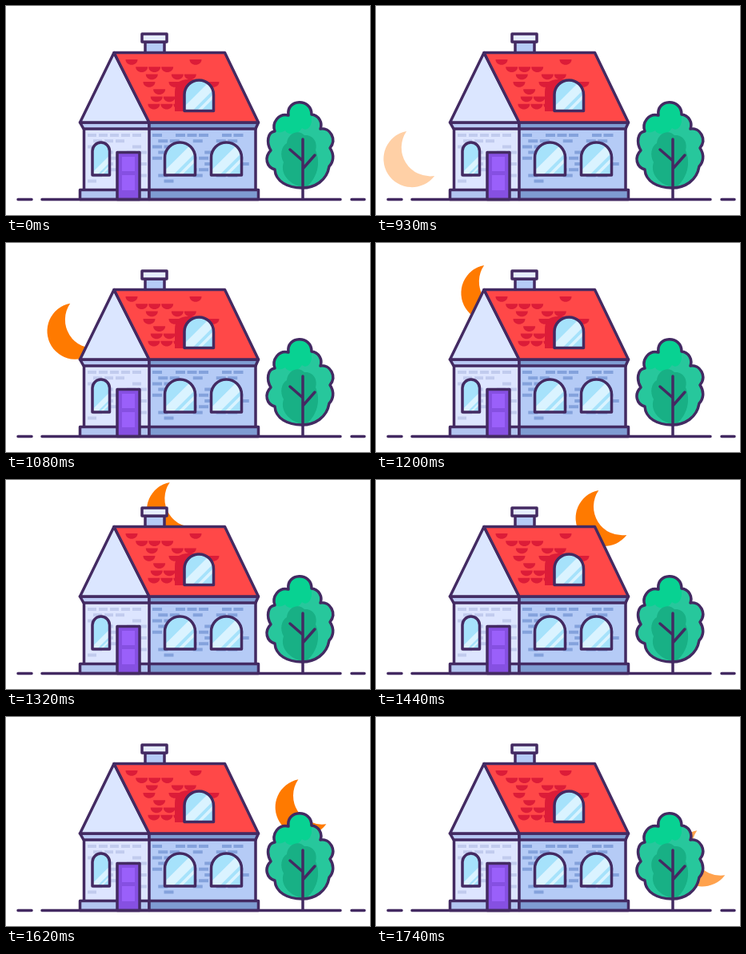
An HTML page that plays this animation: 455 px wide and 262 px high, repeating every 1770 ms.

```html
<!DOCTYPE html>
<html lang="en">
<head>
<meta charset="utf-8">
<title>House and moon</title>
<style>
  html, body { margin: 0; width: 100%; height: 100%; overflow: hidden; background: #fff; }
  svg { display: block; width: 455px; height: 262px; }
  .line { stroke: #432a62; stroke-width: 3.5; stroke-linejoin: round; stroke-linecap: round; }
</style>
</head>
<body>
<svg viewBox="0 0 455 262" fill="none">
  <path id="moon" fill="#ff7a00" d="M0 0A35.4 35.4 0 1 0 35 56A36 36 0 0 1 0 0Z"/>

  <g class="line">
    <path fill="#b5cbf6" d="M174 45H198V59H174Z"/>
    <path fill="#e6edff" d="M170 35H201V45H170Z"/>
  </g>

  <path fill="#dde5ff" d="M97 152H179V242H97Z"/>
  <path fill="#b5cbf6" d="M179 152H312V242H179Z"/>
  <path id="frontBricks" fill="#c1cbee"/>
  <path id="sideBricks" fill="#84a2dc"/>
  <g class="line">
    <path d="M97.5 154V231M179 154V231M312 154V231"/>
    <path fill="#b2c5f0" d="M92.5 230.5H179V242.5H92.5Z"/>
    <path fill="#7f9cd2" d="M179 230.5H315.5V242.5H179Z"/>
    <path fill="#b9c9f4" d="M92.5 146H179V154H97Z"/>
    <path fill="#7f9cd2" d="M179 146H315.5L312 154H179Z"/>
    <path fill="#dbe6ff" d="M135 58.5L92.5 146H179Z"/>
    <path fill="#ff4848" d="M135 58.5H273.5L315.5 146H179Z"/>
  </g>
  <path id="tiles" fill="#dc1c38"/>
  <path fill="#dc1c38" d="M211 132V108Q211 92 228 92H242V132Z"/>
  <g id="windows"></g>

  <path class="line" fill="#8650e2" d="M139 183.5H167V242.5H139Z"/>
  <path fill="#9a60fa" d="M145 189H161V207H145ZM145 212H161V231H145Z"/>

  <clipPath id="crown">
    <path id="leaves" d="M353 137C350 116 382 115 382 136C391 137 396 146 393 154C405 152 414 167 405 178C411 187 409 196 404 201C401 219 386 228 370 228C352 228 337 220 336 205C326 202 322 190 331 181C325 171 327 158 336 157C332 146 341 134 353 137Z"/>
  </clipPath>
  <g clip-path="url(#crown)">
    <path fill="#27c79c" d="M320 110H415V235H320Z"/>
    <path fill="#08d292" d="M325 110H382V145C380 154 375 157 370 153C364 163 352 162 349 156C344 160 337 159 334 154Z"/>
    <path fill="#18b085" d="M351 172C352 159 366 154 373 162C384 161 390 171 387 181C394 197 389 217 374 228C355 225 342 211 347 196C342 187 344 176 351 172Z"/>
  </g>
  <use href="#leaves" class="line"/>
  <path class="line" d="M371 167V242M371 194L355 180M371 204L386 187"/>
  <path class="line" d="M15 242.5H32M45 242.5H418M432 242.5H448"/>
</svg>

<script>
const LOOP = 1770, STEP = 30, RISE = 930;
const byId = id => document.getElementById(id);

function randomizer(seed) {
  return () => (seed = seed * 16807 % 2147483647) / 2147483647;
}

// Fills staggered rows, leaving random gaps; span(y) gives the left and right limits.
function scatter(id, { top, bottom, rowStep, pitch, density, seed, span, shape }) {
  const random = randomizer(seed);
  let d = '';
  for (let y = top, row = 0; y <= bottom; y += rowStep, row++) {
    const [left, right] = span(y);
    for (let x = left + row % 2 * pitch / 2; x <= right; x += pitch)
      if (random() < density) d += `M${x} ${y}${shape}`;
  }
  byId(id).setAttribute('d', d);
}

scatter('tiles', {
  top: 67, bottom: 132, rowStep: 9.3, pitch: 16, density: .52, seed: 4711,
  span: y => [145 + (y - 58) / 2, 250 + (y - 58) / 2],
  shape: 'h15c0 9-15 9-15 0z'
});
const bricks = { top: 160, bottom: 224, rowStep: 7.2 };
scatter('frontBricks', {
  ...bricks, pitch: 14, density: .45, seed: 2024,
  span: () => [102, 166], shape: 'h11v4h-11z'
});
scatter('sideBricks', {
  ...bricks, pitch: 14.5, density: .5, seed: 9001,
  span: () => [183, 297], shape: 'h12v4h-12z'
});

function arch(x, y, w, h) {
  const r = w / 2, bottom = y + h, id = `arch${x}`;
  const d = `M${x} ${bottom}V${y + r}A${r} ${r} 0 0 1 ${x + w} ${y + r}V${bottom}Z`;
  const shine = (from, width) =>
    `M${x + from * w} ${bottom}l${h} ${-h}h${width * w}l${-h} ${h}z`;
  return `<clipPath id="${id}"><path d="${d}"/></clipPath>
    <path fill="#a6e2fb" d="${d}"/>
    <path fill="#daf3ff" clip-path="url(#${id})" d="${shine(-.15, .42)}${shine(.42, .14)}"/>
    <path class="line" d="${d}"/>`;
}
byId('windows').innerHTML = arch(223, 93, 36.5, 38.5)
  + arch(108, 171, 21.5, 41) + arch(198.5, 171, 38, 41) + arch(256.5, 171, 38, 41);

const moon = byId('moon');
function draw(now) {
  const t = Math.floor(now % LOOP / STEP) * STEP;
  const age = t - RISE;
  const angle = (9.9 + age * .192) * Math.PI / 180;
  const radius = 187 - 6 * Math.sin(2 * angle) ** 2;
  const x = 221.7 - radius * Math.cos(angle), y = 189 - radius * Math.sin(angle);
  moon.setAttribute('transform', `translate(${x} ${y})`);
  moon.setAttribute('opacity', age < 0 ? 0 : Math.min(1, .35 + age / 90, (LOOP - t) / 43));
  requestAnimationFrame(draw);
}
draw(0);
</script>
</body>
</html>
```
